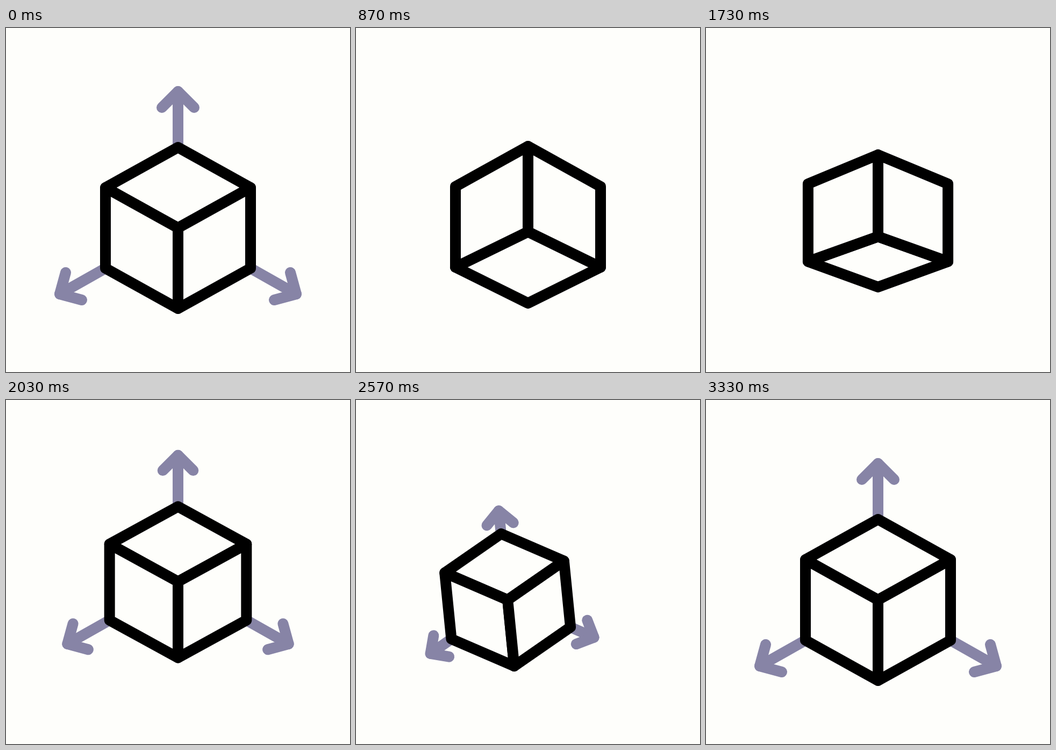
Animation, 640 px wide and 640 px high, one loop 3.61 s. Source, as an HTML page with a canvas:

```html
<!DOCTYPE html>
<html lang="en">
<head>
<meta charset="utf-8">
<title>Cube with axes</title>
<style>
  html, body { margin: 0; width: 100%; height: 100%; overflow: hidden; background: #fefefb; }
  canvas { display: block; width: 100vmin; height: 100vmin; }
</style>
</head>
<body>
<canvas id="stage" width="640" height="640"></canvas>
<script>
const ctx = document.getElementById('stage').getContext('2d');
const LOOP = 3610;
const PAPER = '#fefefb', INK = '#000', AXIS = '#8784a6';
const HALF_W = 135, HALF_H = 75;

const mix = (a, b, u) => a + (b - a) * u;
const progress = (t, from, to) => Math.min(1, Math.max(0, (t - from) / (to - from)));

function ease(t, from, to) {
  const u = progress(t, from, to);
  return u * u * (3 - 2 * u);
}

const hop = (t, from, to) => 49 * Math.sin(Math.PI * progress(t, from, to)) ** 2;

// Hop and tip over, hop again, hop back with the arrows, then squeeze, shake and release.
function poseAt(t) {
  const pull = ease(t, 2000, 2220) - ease(t, 2920, 3330);
  const dip = ease(t, 1600, 1800) - ease(t, 2000, 2220);
  const swing = Math.sin(3 * Math.PI * progress(t, 2230, 2900));
  return {
    lift: hop(t, 0, 930) + hop(t, 930, 1650) + hop(t, 1650, 2200),
    flip: ease(t, 190, 600) - ease(t, 1640, 2050),
    grow: 1 - ease(t, 80, 335) + ease(t, 1790, 1980),
    scale: 1 - 0.05 * dip - 0.175 * pull,
    sway: 38 * swing * ease(t, 2230, 2345),
    pull
  };
}

function trace(points) {
  ctx.beginPath();
  points.forEach(([x, y]) => ctx.lineTo(x, y));
}

function face(...points) {
  trace(points);
  ctx.closePath();
  ctx.fill();
  ctx.stroke();
}

// The two barbs lie at 45 degrees to an upward tip and are narrower on the sides.
function arrow([x, y], [dx, dy], barbs, reach, size) {
  const tip = [x + dx * reach, y + dy * reach];
  const [a, b] = barbs.map(([bx, by]) => [tip[0] + bx * size, tip[1] + by * size]);
  trace([[x, y], tip]);
  ctx.stroke();
  trace([a, tip, b]);
  ctx.stroke();
}

function draw(t) {
  const { lift, flip, grow, scale, sway, pull } = poseAt(t);

  ctx.fillStyle = PAPER;
  ctx.fillRect(0, 0, 640, 640);
  ctx.save();
  ctx.translate(320 + sway, 372 - lift);
  ctx.rotate(sway * 0.15 * Math.PI / 180);
  ctx.lineWidth = 20;
  ctx.lineCap = ctx.lineJoin = 'round';

  const at = (x, y) => [x * scale, y * scale];
  const left = at(-HALF_W, -HALF_H), right = at(HALF_W, -HALF_H);
  const lowLeft = at(-HALF_W, HALF_H), lowRight = at(HALF_W, HALF_H);
  const front = at(0, mix(0, -2 * HALF_H, flip));
  const back = at(0, mix(-2 * HALF_H, 0, flip));
  const lowFront = at(0, mix(2 * HALF_H, 9, flip));
  const lowBack = at(0, mix(0, 142, flip));

  if (grow > 0) {
    ctx.strokeStyle = AXIS;
    const size = grow * scale;
    const sideReach = size * (1 - 0.41 * pull);
    arrow(back, [0, -104], [[-30, 30], [30, 30]], size * (1 - 0.5 * pull), size);
    for (const [base, side] of [[lowLeft, -1], [lowRight, 1]]) {
      arrow(base, [85 * side, 48], [[-11 * side, -40], [-41 * side, 11]], sideReach, size);
    }
  }

  ctx.strokeStyle = INK;
  if (front[1] > back[1]) face(left, back, right, front);
  if (lowFront[1] < lowBack[1]) face(lowLeft, lowFront, lowRight, lowBack);
  face(left, front, lowFront, lowLeft);
  face(right, front, lowFront, lowRight);
  ctx.restore();
}

const start = performance.now();
function tick() {
  draw((performance.now() - start) % LOOP);
  requestAnimationFrame(tick);
}
tick();
</script>
</body>
</html>
```
